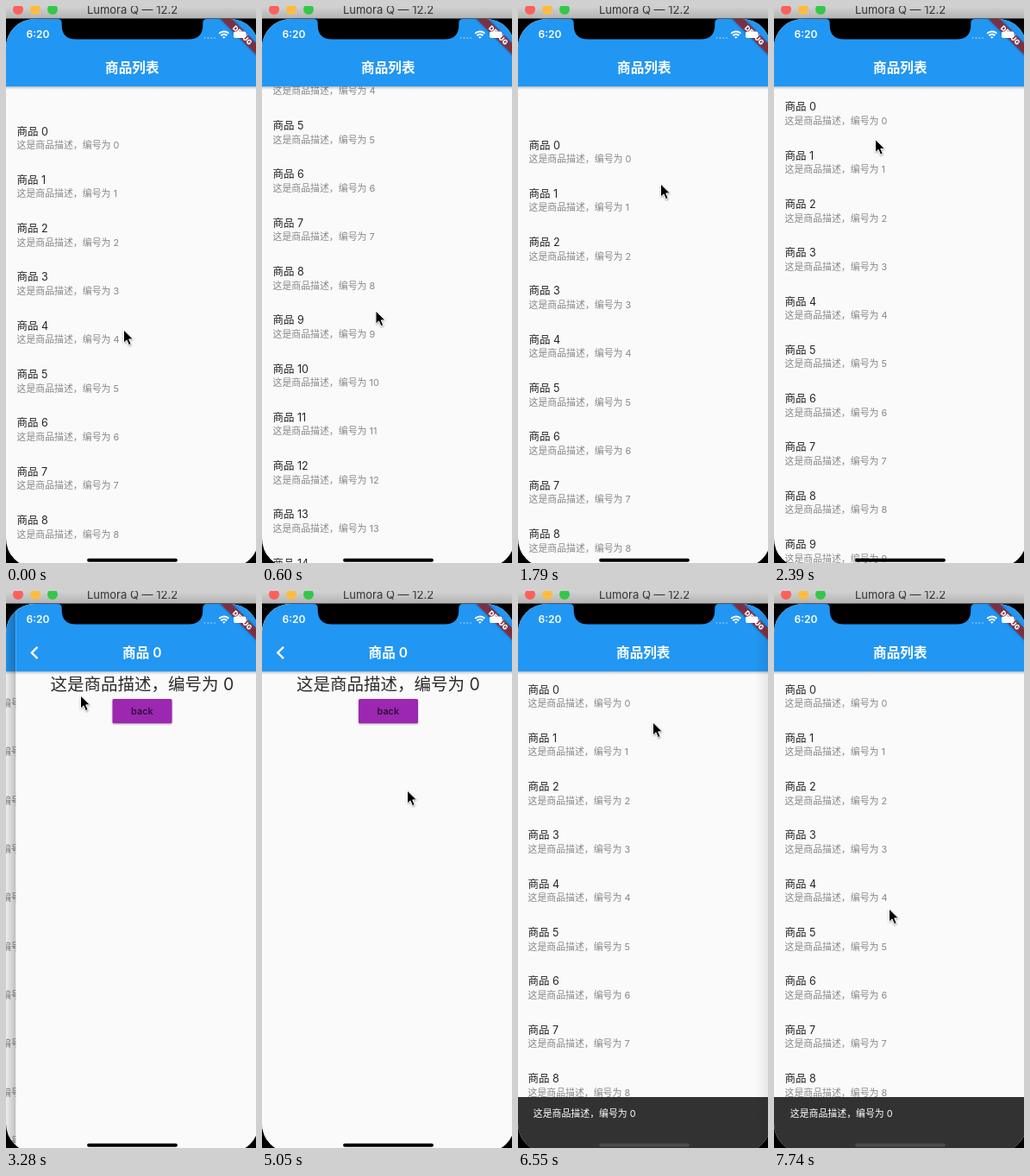
An HTML page that plays this animation: 290x645 px, repeating every 8000 ms.

```html
<!DOCTYPE html>
<html lang="zh-CN">
<head>
<meta charset="utf-8">
<title>商品列表</title>
<style>
  html, body { margin: 0; height: 100%; overflow: hidden; background: #000; }
  svg { display: block; width: 100vw; height: 100vh; }
  text { font-family: Inter, 'Noto Sans CJK SC', 'Noto Sans CJK', sans-serif; }
  .title { font-size: 15.6px; font-weight: 600; fill: #fff; text-anchor: middle; }
  .name { font-size: 12.5px; fill: #252525; }
  .note { font-size: 10.9px; fill: #888; }
  .mid { text-anchor: middle; }
</style>
</head>
<body>
<svg viewBox="0 0 290 645">
  <defs>
    <clipPath id="screen"><rect y="15" width="293" height="635" rx="33"/></clipPath>
    <linearGradient id="chrome" x2="0" y2="1">
      <stop stop-color="#d2d2d2"/><stop offset="1" stop-color="#b4b4b4"/>
    </linearGradient>
    <linearGradient id="drop" x2="0" y2="1">
      <stop stop-color="#000" stop-opacity=".22"/><stop offset="1" stop-color="#000" stop-opacity="0"/>
    </linearGradient>
    <linearGradient id="edge">
      <stop stop-color="#000" stop-opacity="0"/><stop offset="1" stop-color="#000" stop-opacity=".24"/>
    </linearGradient>
    <filter id="soft" x="-50%" y="-50%" width="200%" height="200%"><feGaussianBlur stdDeviation="1.1"/></filter>
    <g id="bar">
      <rect y="93" width="293" height="4" fill="url(#drop)"/>
      <rect y="15" width="293" height="78.2" fill="#2196f3"/>
    </g>
  </defs>

  <rect width="290" height="645"/>
  <g clip-path="url(#screen)">
    <g id="listPage">
      <rect y="15" width="293" height="635" fill="#fafafa"/>
      <g id="rows"></g>
      <use href="#bar"/>
      <text class="title" x="146.3" y="76.7">商品列表</text>
      <g id="snack">
        <rect y="586" width="293" height="64" fill="#323232"/>
        <text id="snackText" class="note" x="18.8" y="608.7" style="fill:#fff">这是商品描述，编号为 0</text>
      </g>
    </g>
    <g id="detailPage">
      <rect id="pageShadow" x="-14.6" y="15" width="14.6" height="635" fill="url(#edge)"/>
      <rect y="15" width="293" height="635" fill="#fafafa"/>
      <use href="#bar"/>
      <path d="M25 64.8l-6.7 6.7 6.7 6.7" fill="none" stroke="#fff" stroke-width="2.4"/>
      <text class="title" x="146.3" y="76.7">商品 0</text>
      <text class="mid" x="146.3" y="114.7" font-size="19.5" fill="#2c2c2c">这是商品描述，编号为 0</text>
      <rect x="112" y="126.2" width="69" height="28" rx="1.5" opacity=".3" filter="url(#soft)"/>
      <rect x="112" y="125" width="69" height="28.2" rx="1.5" fill="#9c27b0"/>
      <text class="mid" x="146.3" y="143" font-size="10.9" font-weight="500" fill="#210826">back</text>
    </g>
    <g transform="translate(293 15) rotate(45)">
      <rect x="-40" y="21.9" width="80" height="9.4" opacity=".45" filter="url(#soft)"/>
      <rect x="-40" y="21.9" width="80" height="9.4" fill="#b71c1c" fill-opacity=".63"/>
      <text class="mid" y="29.5" font-size="8" font-weight="900" fill="#fff">DEBUG</text>
    </g>
    <g fill="#fff">
      <text x="23.5" y="37.4" font-size="12" font-weight="600">6:20</text>
      <g opacity=".45">
        <circle cx="230.5" cy="37" r=".9"/><circle cx="234.5" cy="37" r=".9"/>
        <circle cx="238.3" cy="37" r=".9"/><circle cx="242.2" cy="37" r=".9"/>
      </g>
      <path d="M247.2 31.8q5.6-4.8 11.2 0M249.3 34.2q3.5-3 7 0" fill="none" stroke="#fff" stroke-width="1.9"/>
      <path d="M250.9 35.8q1.9-1.3 3.8 0l-1.9 2z"/>
      <rect x="264" y="29.5" width="14.5" height="7.6" rx="2"/>
      <rect x="279.3" y="32" width="1.1" height="2.8" rx=".5" opacity=".6"/>
    </g>
    <rect id="home" x="94.1" y="639.8" width="104.8" height="3.9" rx="1.95"/>
  </g>
  <path d="M60 15q4.7 0 4.7 4.7v2.3q0 16.5 16.5 16.5h130.6q16.5 0 16.5-16.5v-2.3q0-4.7 4.7-4.7z"/>

  <rect width="290" height="14" fill="url(#chrome)"/>
  <rect y="14" width="290" height="1" fill="#555"/>
  <circle cx="14" cy="4" r="6" fill="#fc605b"/>
  <circle cx="34" cy="4" r="6" fill="#fdbc40"/>
  <circle cx="54" cy="4" r="6" fill="#34c84a"/>
  <text class="mid" x="146.5" y="9" font-size="13" fill="#333">Lumora Q — 12.2</text>

  <g id="cursor">
    <path d="M0 1v15.5l3.6-3.3 2.6 6 3-1.3-2.6-5.9h5z" opacity=".4" filter="url(#soft)"/>
    <path d="M0 0v15.2l3.5-3.3 2.5 5.8 2.7-1.2-2.5-5.6h4.8z" stroke="#fff"/>
  </g>
</svg>
<script>
const LOOP = 8000, TICK = 148.7, LAST_TICK = 52, PITCH = 56.3, WIDTH = 293;
const el = id => document.getElementById(id);
const smooth = k => k * k * (3 - 2 * k);
const settle = k => 1 - (1 - k) ** 3.3;

// Progress from 0 to 1 between two ticks
const between = (tick, from, to, ease) =>
  ease(Math.min(1, Math.max(0, (tick - from) / (to - from))));

function scrollAt(tick) {
  const fling = 576 * between(tick, 0, 8, smooth);
  const back = 592 * between(tick, 8, 12, smooth);
  const spring = 47 * between(tick, 12, 19, settle);
  return -31 + fling - back + spring;
}

// Each gesture: first tick, last tick, destination
const gestures = [
  [0, 8, 128, 331], [8, 12, 166, 206], [12, 19, 87, 121],
  [24, 27, 213, 180], [27, 32, 151, 447], [32, 34, 169, 231],
  [35, 38, 157, 152], [44, 49, 156, 607], [49, 52, 134, 368]
];

function pointerAt(tick) {
  let x = 137, y = 375;
  for (const [from, to, toX, toY] of gestures) {
    const k = between(tick, from, to, smooth);
    x += (toX - x) * k;
    y += (toY - y) * k;
  }
  return [x - .5, y];
}

function move(id, x, y) {
  el(id).setAttribute('transform', `translate(${x} ${y})`);
}

el('rows').innerHTML = Array.from({ length: 30 }, (_, i) => {
  const y = 118.5 + i * PITCH;
  return `<text class="name" x="12.5" y="${y}">商品 ${i}</text>
    <text class="note" x="12.5" y="${y + 15.6}">这是商品描述，编号为 ${i}</text>`;
}).join('');

function draw(time) {
  const tick = Math.min(LAST_TICK, Math.floor((time % LOOP + 6) / TICK));
  const shown = between(tick, 21, 22.6, settle) - between(tick, 41, 45, settle);
  const rise = between(tick, 41, 44, settle);
  move('cursor', ...pointerAt(tick));
  move('rows', 0, -scrollAt(tick));
  move('listPage', -WIDTH / 3 * shown, 0);
  move('detailPage', WIDTH * (1 - shown), 0);
  el('detailPage').style.display = shown ? '' : 'none';
  el('pageShadow').style.opacity = Math.min(1, .3 + shown);
  move('snack', 0, 64 * (1 - rise));
  el('snackText').style.opacity = Math.max(0, rise * 2 - 1);
  el('home').setAttribute('fill', rise > .5 ? '#4b4b4b' : '#000');
}

const start = performance.now();
function loop() {
  draw(performance.now() - start);
  requestAnimationFrame(loop);
}
loop();
</script>
</body>
</html>
```
